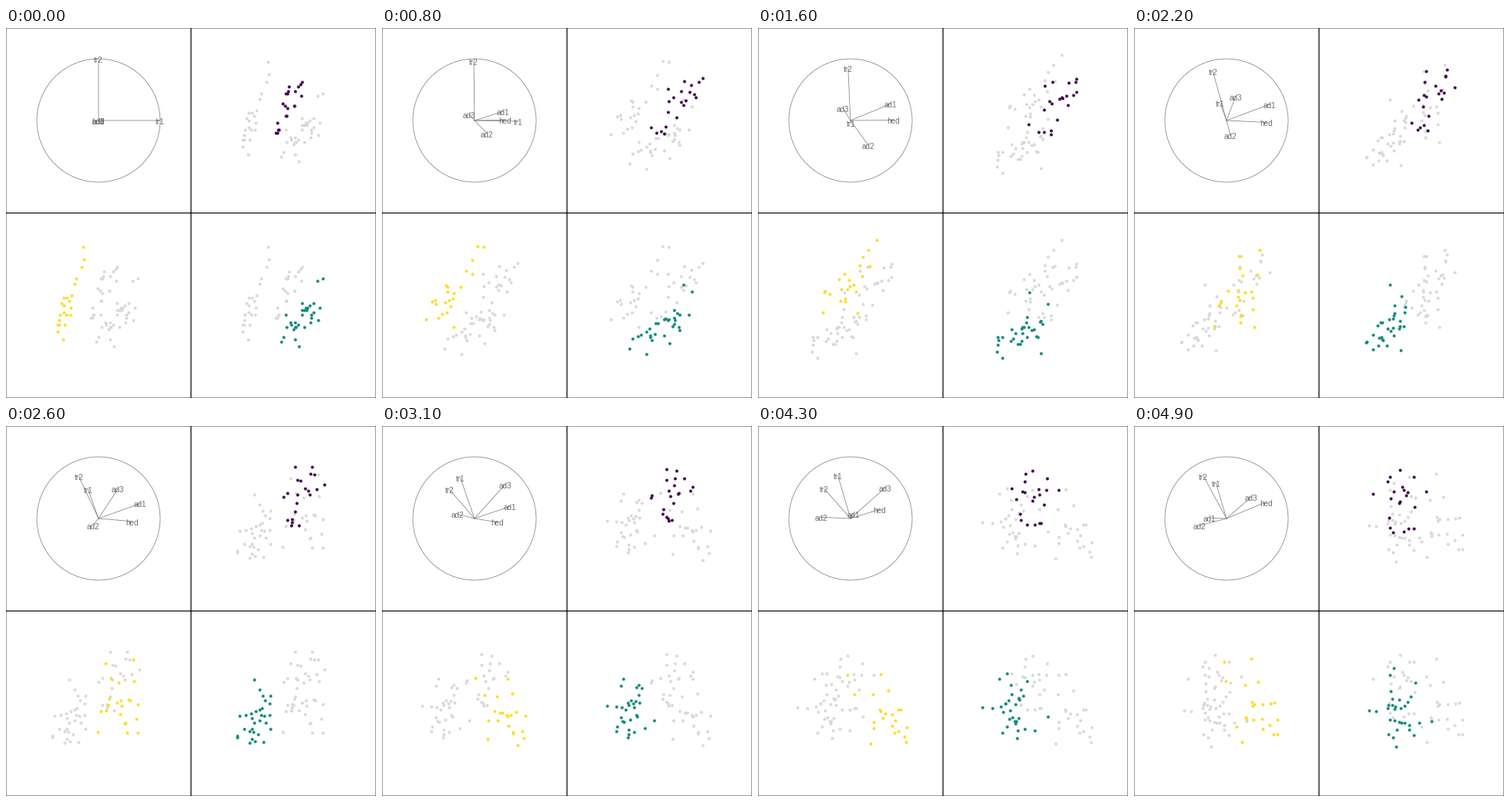
Animation, 480 px wide and 480 px high, one loop 5 s. Source, as a matplotlib script:

```python
import numpy as np
import matplotlib.pyplot as plt
from matplotlib.animation import FuncAnimation
from matplotlib.patches import Circle, Rectangle

SIZE, PANEL, DPI = 480, 240, 72
FRAMES, INTERVAL = 50, 100
DATA_SCALE, AXIS_SCALE = 122.6, 80
LINE_WIDTH = 0.75
GREY, INK, PALE = "#7F7F7F", "#707070", "#D9D9D9"
LABELS = ["tr1", "tr2", "hed", "ad1", "ad2", "ad3"]

# Measurement ranges, and how strongly each one follows overall body size.
LOW = np.array([122, 107, 43, 116, 8, 55])
HIGH = np.array([242, 146, 58, 157, 16, 123])
SIZE_EFFECT = np.array([0.88, 0.88, 0.65, 0.45, 0.05, 0.25])

# Colour, panel centre, count, mean and spread of the six measurements.
GROUPS = [
    ("#41004F", (360, 120), 21,
     [183, 130, 51.2, 146, 14.1, 105], [12, 7, 2.2, 5.6, 0.9, 6]),
    ("#FBDE28", (120, 360), 22,
     [138, 125, 51.6, 138, 10.1, 107], [9, 8.5, 2.8, 4.1, 1.0, 6]),
    ("#148C80", (360, 360), 31,
     [201, 119, 48.9, 125, 14.3, 81], [14, 6.5, 2.3, 4.6, 1.1, 9]),
]


def zscore(values):
    return (values - values.mean(axis=0)) / values.std(axis=0)


def make_group(rng, count, mean, spread):
    size = zscore(rng.standard_normal((count, 1)))
    noise = zscore(rng.standard_normal((count, 6)))
    z = SIZE_EFFECT * size + np.sqrt(1 - SIZE_EFFECT**2) * noise
    return np.round(mean + np.array(spread) * z)


def orthonormal(x, y):
    u, _, vt = np.linalg.svd(np.column_stack([x, y]), full_matrices=False)
    return u @ vt


def geodesic(a, b, t):
    """Turn plane a towards plane b through their principal angles."""
    u, cosines, vt = np.linalg.svd(a.T @ b)
    start, end = a @ u, b @ vt.T
    angles = np.arccos(np.clip(cosines, -1, 1))
    tangent = end - start * cosines
    tangent /= np.maximum(np.linalg.norm(tangent, axis=0), 1e-9)
    return (start * np.cos(t * angles) + tangent * np.sin(t * angles)) @ u.T


# Time and plane of each turning point of the tour.
WAYPOINTS = [
    (0, orthonormal(*np.eye(6)[:2])),
    (16, orthonormal([0.01, -0.04, 0.69, 0.64, 0.29, -0.12],
                     [-0.04, 0.85, 0, 0.26, -0.41, 0.2])),
    (35.7, orthonormal([-0.28, -0.44, 0.16, 0.4, -0.43, 0.59],
                       [0.76, 0.21, -0.06, 0.13, 0.23, 0.55])),
    (49, orthonormal([-0.16, -0.36, 0.64, -0.27, -0.44, 0.4],
                     [0.575, 0.69, 0.26, 0.01, -0.11, 0.34])),
]


def projection(frame):
    for (t0, a), (t1, b) in zip(WAYPOINTS, WAYPOINTS[1:]):
        if frame <= t1:
            return geodesic(a, b, (frame - t0) / (t1 - t0))


rng = np.random.default_rng(5)
samples = [make_group(rng, *group[2:]) for group in GROUPS]
data = (np.vstack(samples) - LOW) / (HIGH - LOW)
data -= data.mean(axis=0)
member = np.repeat(np.arange(len(GROUPS)), [len(s) for s in samples])

fig = plt.figure(figsize=(SIZE / DPI, SIZE / DPI), dpi=DPI, facecolor="white")
ax = fig.add_axes([0, 0, 1, 1])
ax.set_xlim(0, SIZE)
ax.set_ylim(SIZE, 0)
ax.axis("off")

for left in (0, PANEL):
    for top in (0, PANEL):
        ax.add_patch(Rectangle((left, top), PANEL, PANEL, fill=False,
                               ec="black", lw=LINE_WIDTH, snap=False,
                               zorder=5))
ax.add_patch(Circle((120, 120), AXIS_SCALE, fill=False, ec=GREY,
                    lw=LINE_WIDTH))

spokes = [ax.plot([], [], color=GREY, lw=LINE_WIDTH, snap=False)[0]
          for _ in LABELS]
names = [ax.text(120, 120, label, color=INK, fontsize=9.96, ha="center",
                 va="baseline", family="Liberation Sans") for label in LABELS]


def dots(color, zorder):
    return ax.scatter([], [], s=16, color=color, linewidths=0, zorder=zorder)


panels = [(np.array(centre), dots(PALE, 2), dots(color, 3))
          for color, centre, *_ in GROUPS]


def update(frame):
    basis = projection(frame)
    for (wx, wy), spoke, name in zip(basis, spokes, names):
        x, y = 120 + AXIS_SCALE * wx, 120 - AXIS_SCALE * wy
        spoke.set_data([120, x], [120, y])
        name.set_position((x, y + 4.8))
    points = data @ basis * [DATA_SCALE, -DATA_SCALE]
    for i, (centre, others, own) in enumerate(panels):
        others.set_offsets(points[member != i] + centre)
        own.set_offsets(points[member == i] + centre)
    return []


anim = FuncAnimation(fig, update, frames=FRAMES, interval=INTERVAL,
                     repeat=True, repeat_delay=0)
plt.show()
```
